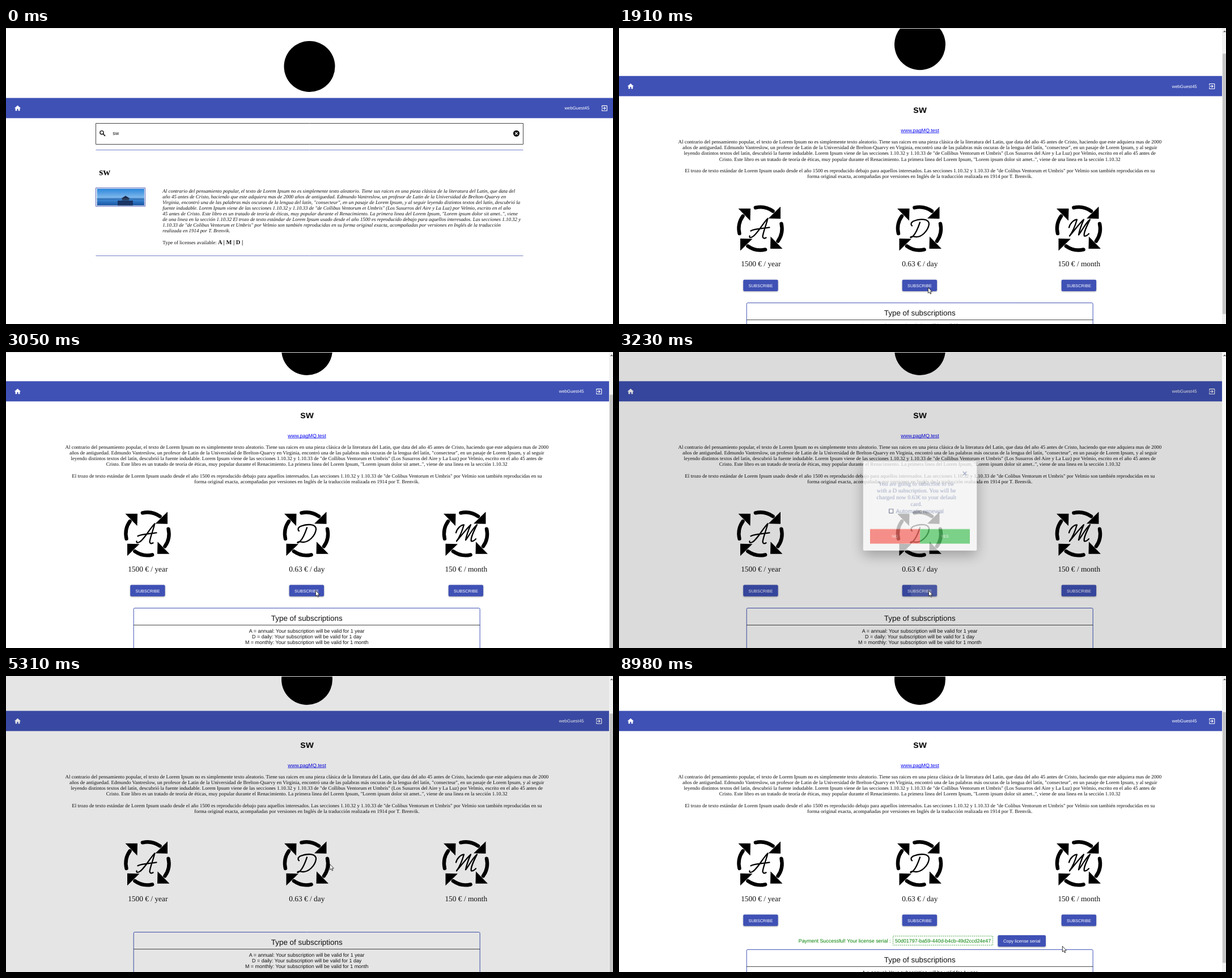
These frames come from a looping animation (1071 by 523 pixels, 9.06 s). An HTML page with a canvas:

```html
<!DOCTYPE html>
<html lang="es">
<head>
<meta charset="utf-8">
<title>License shop</title>
<style>
html, body { margin: 0; width: 100%; height: 100%; overflow: hidden; background: #fff; }
canvas { display: block; width: 1071px; height: 523px; }
</style>
</head>
<body>
<canvas id="stage" width="1071" height="523"></canvas>
<script>
const W = 1071, H = 523, LOOP = 9060;
const K = W / 1920; // page zoom: font sizes are given in unscaled px
const SANS = '"Liberation Sans", Arial, sans-serif';
const SERIF = '"Liberation Serif", "Times New Roman", serif';
const BLUE = '#3f51b5';
const BODY = 16.12;
const stage = document.getElementById('stage').getContext('2d');
const layer = document.createElement('canvas');
layer.width = W;
layer.height = H;
let g = stage;

// "/" breaks lines on the list page, "|" on the detail page
const ABOUT = 'Al contrario del pensamiento popular, el texto de Lorem Ipsum no es simplemente texto aleatorio. Tiene sus raices en una pieza clásica de la literatura del Latin, que data del /año 45 antes de Cristo, haciendo que este adquiera mas de 2000 |años de antiguedad. Edmundo Vantreslow, un profesor de Latin de la Universidad de Brelton-Quarvy en /Virginia, encontró una de las palabras más oscuras de la lengua del latín, "consecteur", en un pasaje de Lorem Ipsum, y al seguir |leyendo distintos textos del latín, descubrió la /fuente indudable. Lorem Ipsum viene de las secciones 1.10.32 y 1.10.33 de "de Collibus Ventorum et Umbris" (Los Susurros del Aire y La Luz) por Velmio, escrito en el año /45 antes de |Cristo. Este libro es un tratado de teoría de éticas, muy popular durante el Renacimiento. La primera linea del Lorem Ipsum, "Lorem ipsum dolor sit amet..", viene /de una linea en la sección 1.10.32 ||El trozo de texto estándar de Lorem Ipsum usado desde el año 1500 es reproducido debajo para aquellos interesados. Las secciones 1.10.32 y /1.10.33 de "de Colibus Ventorum et Umbris" por Velmio son también reproducidas en su |forma original exacta, acompañadas por versiones en Inglés de la traducción /realizada en 1914 por T. Brenvik.';
const listLines = ABOUT.replaceAll('|', '').split('/');
const detailLines = ABOUT.replaceAll('/', '').split('|');

const ICONS = {
  home: new Path2D('M10 20v-6h4v6h5v-8h3L12 3 2 12h3v8z'),
  exit: new Path2D('M10.09 15.59L11.5 17l5-5-5-5-1.41 1.41L12.67 11H3v2h9.67zM19 3H5c-1.1 0-2 .9-2 2v4h2V5h14v14H5v-4H3v4c0 1.1.9 2 2 2h14c1.1 0 2-.9 2-2V5c0-1.1-.9-2-2-2z')
};
const PLANS = [
  { x: 249.5, price: '1500 € / year', letter: new Path2D('M-19 13Q-20 17 -15 15C-6 11 3 -8 13 -18C10 -6 5 6 4 14Q5 19 10 16M-17 4C-10 0 4 0 16 -2') },
  { x: 530, price: '0.63 € / day', letter: new Path2D('M1 -11C-2 -2 -6 8 -11 13C-17 19 -18 13 -10 14C4 18 16 2 17 -8C17 -18 2 -18 -11 -13Q-17 -9 -13 -5') },
  { x: 811, price: '150 € / month', letter: new Path2D('M-17 -2C-15 -10 -8 -16 -3 -16Q-8 2 -16 13C-8 4 2 -10 9 -16Q2 0 0 11C6 4 12 -10 20 -16C14 -4 8 8 10 13Q13 14 18 9') }
];
const CURSORS = {
  arrow: new Path2D('M0 0V10L2.3 8L3.9 11.6L5.4 11L3.9 7.5H7Z'),
  hand: new Path2D('M-1 1Q0 -.4 1 1V5L5 6Q6.6 6.4 6.3 8L5.5 13H-.5L-3.5 8.4Q-3.6 7 -1 8.4Z'),
  beam: new Path2D('M-2 -5Q0 -5 0 -4Q0 -5 2 -5M0 -4V4M-2 5Q0 5 0 4Q0 5 2 5')
};
// time, x, y, shape from then on
const TRACK = [
  [70, 826, 488, 'arrow'], [710, 169, 251, 'hand'], [870, 169, 251, 'arrow'],
  [1410, 506, 462, 'beam'], [1730, 545, 458, 'arrow'], [2240, 545, 458, 'arrow'],
  [2590, 546, 421, 'arrow'], [3230, 546, 421, 'arrow'], [3530, 498, 310, 'arrow'],
  [3610, 498, 310, 'arrow'], [3920, 509, 281, 'hand'], [4200, 509, 281, 'hand'],
  [4600, 571, 332, 'hand'], [5215, 571, 332, 'arrow'], [5310, 571, 332, 'arrow'],
  [5930, 608, 429, 'arrow'], [6240, 608, 429, 'arrow'], [6720, 760, 477, 'arrow'],
  [8130, 760, 477, 'arrow'], [8510, 945, 512, 'arrow'], [8580, 945, 512, 'arrow'],
  [8670, 968, 514, 'arrow'], [8980, 782, 477, 'arrow'], [LOOP, 782, 477, 'arrow']
];
// the picture ticks every 80 ms, restarting at these times
const BEATS = [0, 70, 870, 1410, 1830, 2140, 2760, 3230, 3690, 4200, 5130, 5310, 6320, 7670, 7910, 8210, 8660, 8980];

const clamp = v => Math.min(1, Math.max(0, v));
const part = (t, start, len) => clamp((t - start) / len);

function bezier(x1, y1, x2, y2) {
  const at = (a, b, s) => 3 * a * s * (1 - s) ** 2 + 3 * b * s * s * (1 - s) + s ** 3;
  return p => {
    let lo = 0, hi = 1;
    for (let i = 0; i < 24; i++) {
      const mid = (lo + hi) / 2;
      if (at(x1, x2, mid) < p) lo = mid; else hi = mid;
    }
    return at(y1, y2, lo);
  };
}
const fadeEase = bezier(.25, .8, .25, 1);
const openEase = bezier(0, 0, .2, 1);
const closeEase = bezier(.4, 0, .2, 1);

function text(str, x, y, size, { font = SANS, style = '', color = '#111', align = 'left' } = {}) {
  g.save();
  g.translate(x, y);
  g.scale(K, K);
  g.font = `${style} ${size}px ${font}`;
  g.textRendering = 'geometricPrecision';
  g.textAlign = align;
  g.fillStyle = color;
  g.fillText(str, 0, 0);
  const width = g.measureText(str).width * K;
  g.restore();
  return width;
}

function rect(x, y, w, h, color) {
  g.fillStyle = color;
  g.fillRect(x, y, w, h);
}

function frame(x, y, w, h, color, r = 0, lineWidth = 1) {
  g.strokeStyle = color;
  g.lineWidth = lineWidth;
  g.beginPath();
  g.roundRect(x, y, w, h, r);
  g.stroke();
}

function disc(x, y, r, color) {
  g.fillStyle = color;
  g.beginPath();
  g.arc(x, y, r, 0, 7);
  g.fill();
}

function line(x1, y1, x2, y2, color, width = 1) {
  g.strokeStyle = color;
  g.lineWidth = width;
  g.beginPath();
  g.moveTo(x1, y1);
  g.lineTo(x2, y2);
  g.stroke();
}

function cross(x, y, r, color, width) {
  line(x - r, y - r, x + r, y + r, color, width);
  line(x - r, y + r, x + r, y - r, color, width);
}

function panel(x, y, w, h, color, blur, drop, shade) {
  g.save();
  g.shadowColor = `rgba(0,0,0,${shade})`;
  g.shadowBlur = blur;
  g.shadowOffsetY = drop;
  g.fillStyle = color;
  g.beginPath();
  g.roundRect(x, y, w, h, 2.2);
  g.fill();
  g.restore();
}

function icon(path, x, y) {
  g.save();
  g.translate(x - 12 * K, y - 12 * K);
  g.scale(K, K);
  g.fillStyle = '#fff';
  g.fill(path);
  g.restore();
}

function header(mid, right, blue) {
  disc(mid, 68, 45, '#000');
  rect(0, 123.6, W, 35.7, blue);
  icon(ICONS.home, 20.5, 141.8);
  icon(ICONS.exit, right, 141.8);
  text('webGuest45', right - 26.7, 144.4, 14, { color: '#fff', align: 'right' });
}

function photo() {
  frame(158.5, 282.5, 87, 32.5, '#5361b8');
  const sky = g.createLinearGradient(0, 284, 0, 314);
  sky.addColorStop(0, '#2b86dc');
  sky.addColorStop(.5, '#7db6ea');
  sky.addColorStop(.62, '#3f8ad6');
  sky.addColorStop(1, '#14509f');
  rect(160.5, 284, 83.5, 29.5, sky);
  rect(160.5, 301.5, 83.5, 1.2, '#2a5e9c');
  g.fillStyle = '#1b2a48';
  g.beginPath();
  g.moveTo(203, 301.5); g.lineTo(211, 296.5); g.lineTo(219, 301.5);
  g.fill();
  rect(205, 301.5, 12, 3, '#2d3c58');
  rect(197, 305, 27, 8.5, '#1a3566');
}

function listPage() {
  header(535.5, 1056, BLUE);
  frame(158.5, 168.5, 754, 37, '#444');
  g.strokeStyle = '#111';
  g.lineWidth = 1.4;
  g.beginPath();
  g.arc(169, 184.7, 3.1, 0, 7);
  g.stroke();
  line(171.2, 187, 175, 190.8, '#111', 1.7);
  text('sw', 188.3, 188.8, 16);
  disc(900.5, 186.3, 5.6, '#111');
  cross(900.5, 186.3, 2.2, '#fff', 1.2);
  line(158.5, 215.5, 912.5, 215.5, '#7480c6');
  text('sw', 164.3, 260, 32, { font: SERIF, style: 'bold' });
  photo();
  listLines.forEach((s, i) => text(s, 276.3, 290.6 + i * 10.06, 16, { font: SERIF, style: 'italic' }));
  const w = text('Type of licenses available: ', 276.3, 382, BODY, { font: SERIF });
  text('A | M | D |', 276.3 + w, 382, 18.72, { font: SERIF, style: 'bold' });
  line(158.5, 402.5, 912.5, 402.5, '#7480c6');
}

function planIcon({ x, letter }) {
  g.save();
  g.translate(x, 393.3);
  g.strokeStyle = g.fillStyle = '#000';
  g.lineCap = g.lineJoin = 'round';
  for (let i = 0; i < 4; i++) {
    g.lineWidth = 6.4;
    g.beginPath();
    g.arc(0, 0, 38, -1.8, -.95);
    g.stroke();
    g.beginPath();
    g.moveTo(35.5, -39); g.lineTo(35.5, -17.5); g.lineTo(14, -18);
    g.fill();
    g.rotate(Math.PI / 2);
  }
  g.lineWidth = 2.3;
  g.stroke(letter);
  g.restore();
}

function button(label, x, y, w, size, color) {
  panel(x - w / 2, y, w, 20.2, color, 2.5, 1, .32);
  text(label, x, y + 13.1, size, { color: '#fff', align: 'center' });
}

function ripple(x, y, w, h, cx, cy, age) {
  if (age <= 0 || age > 400) return;
  g.save();
  g.beginPath();
  g.rect(x, y, w, h);
  g.clip();
  disc(cx, cy, age * .32, `rgba(255,255,255,${.12 * (1 - part(age, 150, 250))})`);
  g.restore();
}

function successRow() {
  const green = '#008000';
  text('Payment Successful! Your license serial :', 316.7, 533, 16, { color: green });
  g.setLineDash([1.7, 1.7]);
  frame(483.5, 521.5, 176, 16, green, 0, .8);
  g.setLineDash([]);
  text('50d01797-ba59-440d-b4cb-49d2ccd24e47', 571.6, 533, 16, { color: green, align: 'center' });
  button('Copy license serial', 710.7, 520, 84.6, 14, BLUE);
}

function detailPage(t, dim) {
  const blue = dim > .2 ? '#576ef7' : BLUE;
  const busy = t >= 5290 && t < 7910;
  const done = t >= 7910;
  header(531, 1046.3, blue);
  text('sw', 531, 188.6, 32, { style: 'bold', align: 'center' });
  const link = text('www.pagMQ.test', 531, 222.8, 16, { color: '#0000ee', align: 'center' });
  line(531 - link / 2, 224.2, 531 + link / 2, 224.2, '#0000ee', .8);
  detailLines.forEach((s, i) => text(s.trim(), 530.8, 243.2 + i * 10.06, BODY, { font: SERIF, align: 'center' }));
  for (const plan of PLANS) {
    planIcon(plan);
    text(plan.price, plan.x + .8, 460, 24, { font: SERIF, align: 'center' });
    if (!busy) button('SUBSCRIBE', plan.x + .4, 483.6, 61.4, 13.33, blue);
  }
  ripple(500, 483.6, 61.4, 20.2, 546, 493, t - 3130);
  if (done) successRow();
  const top = done ? 545.4 : busy ? 514.6 : 524.5;
  frame(225.2, top, 611, 200, blue, 2);
  text('Type of subscriptions', 530.7, top + 22.4, 24, { align: 'center' });
  line(225, top + 30, 836.5, top + 30, '#444');
  ['A = annual: Your subscription will be valid for 1 year',
    'D = daily: Your subscription will be valid for 1 day',
    'M = monthly: Your subscription will be valid for 1 month'
  ].forEach((s, i) => text(s, 530.7, top + 43.6 + i * 10.06, 16, { align: 'center' }));
}

function scrollbar(t, scroll) {
  const locked = t >= 3175 && t < 5290;
  const done = t >= 7910;
  rect(1064, 0, 7, H, locked ? '#f8f8f8' : '#f1f1f1');
  g.strokeStyle = '#555';
  g.lineWidth = 1.2;
  g.beginPath();
  g.moveTo(1066.6, 7.4); g.lineTo(1068.6, 5.4); g.lineTo(1070.6, 7.4);
  g.stroke();
  if (!locked) rect(1065, 10 + scroll * (done ? .87 : .91), 6, done ? 443 : 460, '#c4c4c4');
}

function dialog(t) {
  const ink = '#8593b8', mid = 524;
  panel(421.6, 186, 218.8, 172, '#fff', 26, 9, .4);
  cross(617.3, 209.3, 3.6, '#7f8db5', 1.3);
  ['You are going to subscribe to sw', 'with a D subscription. You will be',
    'charged now 0.63€ to your default', 'card.'
  ].forEach((s, i) => text(s, mid, 233.2 + i * 12.8, 20, { font: SERIF, color: ink, align: 'center' }));
  if (t >= 4200 && t < 4400) disc(475.5, 281.8, 10, `rgba(63,81,181,${.16 * (1 - part(t, 4250, 150))})`);
  frame(471.7, 278, 7.7, 7.7, '#4d5678', 0, 1.2);
  text('Automatic renewal', 484.6, 285.8, 20, { color: ink });
  rect(435, 316.6, 96.2, 28, '#ff7169');
  rect(531.2, 316.6, 95.8, 28, '#57ce68');
  ripple(531.2, 316.6, 95.8, 28, 571, 332, t - 5130);
  text('NO', 482.6, 333.3, 13.33, { color: '#fff', align: 'center' });
  text('YES', 578.8, 333.3, 13.33, { color: '#fff', align: 'center' });
}

function showDialog(t) {
  const open = openEase(part(t, 3175, 150));
  const alpha = open * (1 - closeEase(part(t, 5215, 75)));
  if (alpha <= 0) return;
  if (alpha >= 1) return dialog(t);
  g = layer.getContext('2d');
  g.clearRect(0, 0, W, H);
  dialog(t);
  g = stage;
  const size = .7 + .3 * open;
  g.save();
  g.globalAlpha = alpha;
  g.translate(531, 272);
  g.scale(size, size);
  g.drawImage(layer, -531, -272);
  g.restore();
}

function pointer(t) {
  const i = TRACK.findLastIndex(k => k[0] <= t);
  if (i < 0) return;
  const [t0, x0, y0, shape] = TRACK[i];
  const [t1, x1, y1] = TRACK[i + 1] || TRACK[i];
  const p = part(t, t0, t1 - t0 || 1);
  const e = p * p * (3 - 2 * p);
  const moving = x0 !== x1 && p > 0 && p < .85;
  const path = CURSORS[moving ? 'arrow' : shape];
  g.save();
  g.translate(x0 + (x1 - x0) * e + .4, y0 + (y1 - y0) * e + .4);
  g.lineJoin = 'round';
  g.lineWidth = .9;
  g.strokeStyle = '#222';
  if (path !== CURSORS.beam) {
    g.fillStyle = '#fff';
    g.fill(path);
  }
  g.stroke(path);
  g.restore();
}

function draw(t) {
  rect(0, 0, W, H, '#fff');
  if (t < 870) {
    listPage();
  } else {
    const dim = .32 * (fadeEase(part(t, 3175, 400)) - fadeEase(part(t, 5215, 400)));
    const p = part(t, 1760, 467);
    const scroll = t >= 5290 ? 62 : 72 * (1 - (1 - p) ** 2);
    g.save();
    g.translate(0, -scroll);
    detailPage(t, dim);
    g.restore();
    rect(0, 0, W, H, `rgba(0,0,0,${dim})`);
    scrollbar(t, scroll);
    showDialog(t);
  }
  rect(0, 0, W, 1, '#e4e4e4');
  pointer(t);
}

let start;
function tick(now) {
  start ??= now;
  const t = (now - start) % LOOP;
  const beat = BEATS.findLast(b => b <= t);
  draw(beat + Math.floor((t - beat) / 80) * 80);
  requestAnimationFrame(tick);
}
requestAnimationFrame(tick);
</script>
</body>
</html>
```
